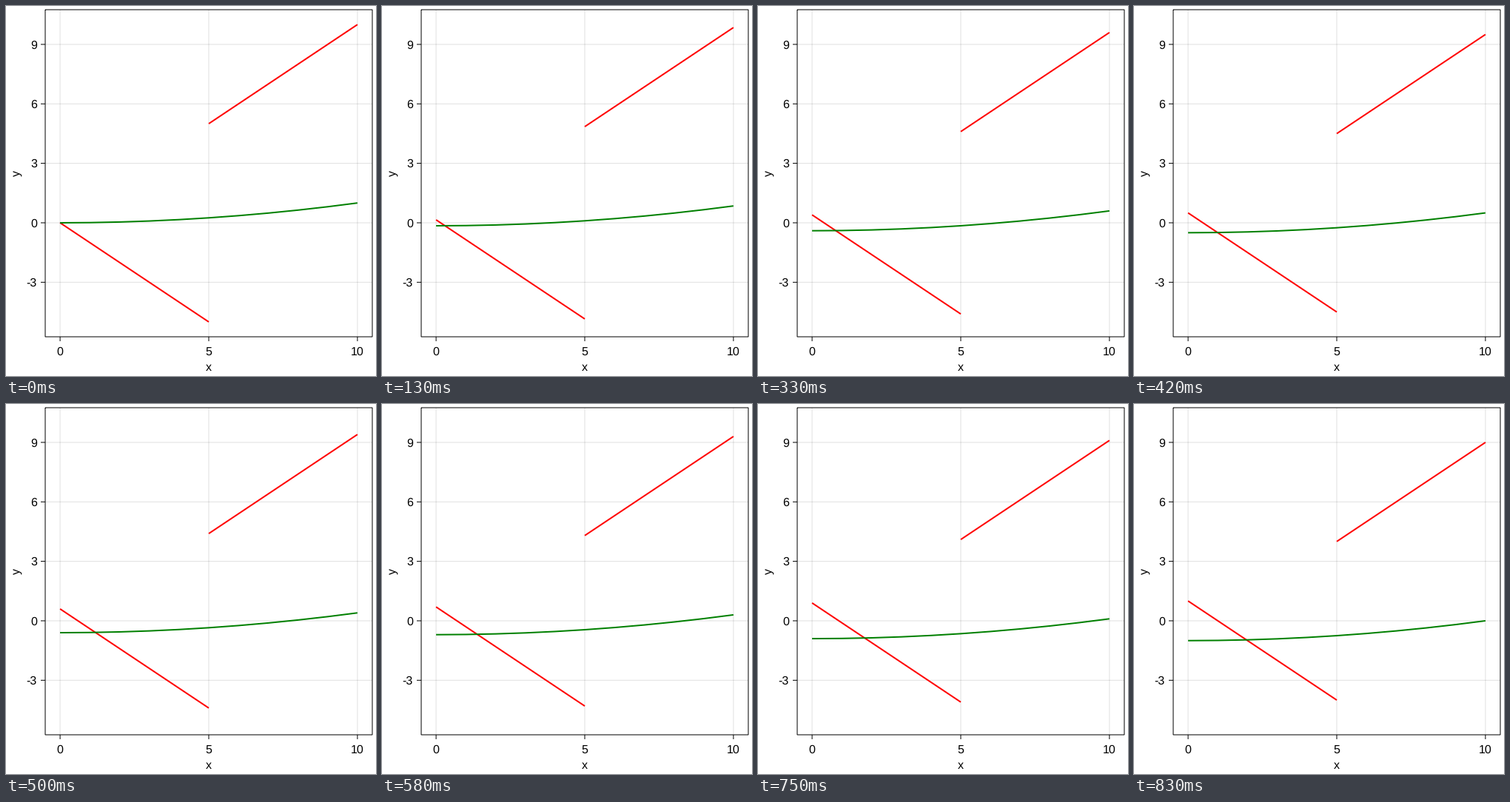
A matplotlib script for the animation above (0.87 s loop, 500 px wide and 500 px high).

```python
import numpy as np
import matplotlib.pyplot as plt
from matplotlib.animation import FuncAnimation

plt.rcParams["font.family"] = "Liberation Sans"
plt.rcParams["text.hinting"] = "none"

SIZE, DPI = 500, 100
PX = 72 / DPI                       # points per pixel
LEFT, RIGHT, TOP, BOTTOM = 53, 495, 5, 447
TICK = 6
FONT = 16 * PX

TICK_MS = 10
LOOP_TICKS = 87
STEPS = 20
# 24 pictures per second, rounded to the nearest 10 ms
STARTS = np.floor(np.arange(STEPS + 1) * 100 / 24 + 0.5)

fig = plt.figure(figsize=(SIZE / DPI, SIZE / DPI), dpi=DPI, facecolor="white")
ax = fig.add_axes([0, 0, 1, 1])
ax.set_xlim(0, SIZE)
ax.set_ylim(SIZE, 0)
ax.axis("off")


def to_x(x):
    return LEFT + (np.asarray(x) + 0.5) / 11 * (RIGHT - LEFT)


def to_y(y):
    return TOP + (10.75 - np.asarray(y)) / 16.5 * (BOTTOM - TOP)


def stroke(xs, ys, color="black", width=1, **kw):
    line, = ax.plot(xs, ys, color=color, lw=width * PX, snap=False,
                    solid_capstyle="butt", solid_joinstyle="miter", **kw)
    return line


def label(x, y, text, ha="center", **kw):
    ax.text(x, y, text, ha=ha, va="baseline", fontsize=FONT, color="black",
            rotation_mode="anchor", **kw)


for v in (0, 5, 10):
    x = to_x(v)
    stroke([x, x], [TOP, BOTTOM], alpha=0.12)
    stroke([x, x], [BOTTOM, BOTTOM + TICK])
    label(x, 471.5, str(v))

for v in (-3, 0, 3, 6, 9):
    y = to_y(v)
    stroke([LEFT, RIGHT], [y, y], alpha=0.12)
    stroke([LEFT - TICK, LEFT], [y, y])
    label(42, y + 5.7, str(v), ha="right")

label(274, 493, "x")
label(18.5, 226, "y", rotation=90)

low = np.array([0, 5])
high = np.array([5, 10])
xs = np.linspace(0, 10, 11)

falling = stroke(to_x(low), to_y(-low), "red", 2, zorder=4)
rising = stroke(to_x(high), to_y(high), "red", 2, zorder=4)
curve = stroke(to_x(xs), to_y(xs**2 / 100), "green", 2, zorder=5)

# Frame of the plot area
stroke([LEFT, RIGHT, RIGHT, LEFT, LEFT], [TOP, TOP, BOTTOM, BOTTOM, TOP], zorder=6)


def update(tick):
    step = np.searchsorted(STARTS, tick, side="right") - 1
    shift = step / STEPS
    falling.set_ydata(to_y(shift - low))
    rising.set_ydata(to_y(high - shift))
    curve.set_ydata(to_y(xs**2 / 100 - shift))
    return falling, rising, curve


anim = FuncAnimation(fig, update, frames=LOOP_TICKS, interval=TICK_MS,
                     repeat=True, repeat_delay=0, blit=False)
plt.show()
```
